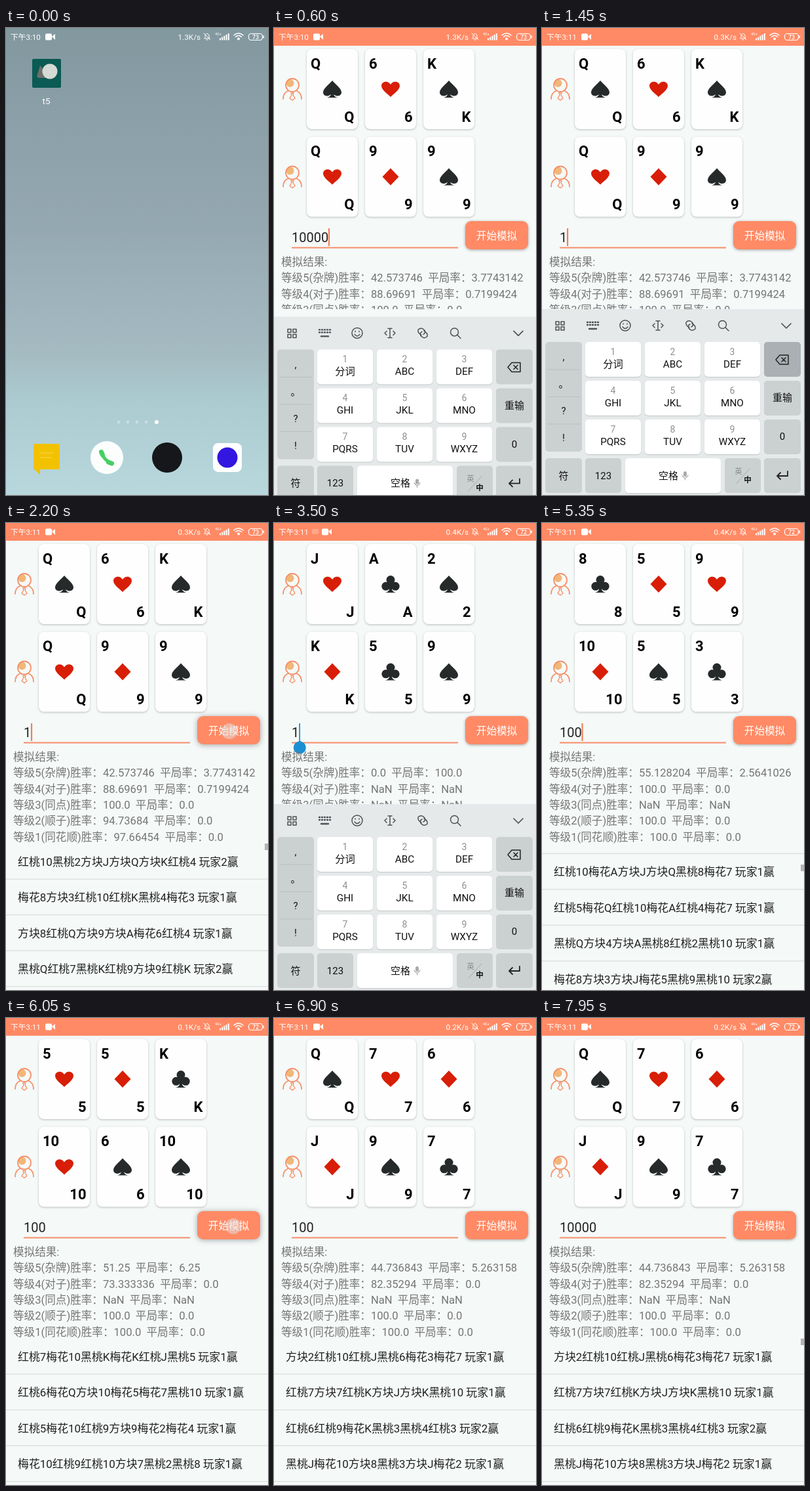
An HTML page with a canvas that plays this animation: 400 by 711 pixels, repeating every 8 s.

```html
<!DOCTYPE html>
<html lang="zh-CN">
<head>
<meta charset="utf-8">
<style>
html, body { margin: 0; height: 100%; overflow: hidden; background: #f5f9f8; }
canvas { display: block; }
</style>
</head>
<body>
<canvas id="stage" width="400" height="711"></canvas>
<script>
const ctx = document.getElementById('stage').getContext('2d');
const LOOP = 8000, KEYBOARD_TOP = 428, KEYBOARD_HEIGHT = 283, LIST_TOP = 488, ROW = 54.5;
const ORANGE = '#ff8a65', BACK = '#f5f9f8', INK = '#4d5153';
const FONT = 'Roboto, "Noto Sans CJK SC", "Noto Sans CJK", sans-serif';

const suitNames = { '♠': '黑桃', '♥': '红桃', '♣': '梅花', '♦': '方块' };
const ball = (x, y, r) => `M${x - r} ${y}a${r} ${r} 0 1 1 ${2 * r} 0a${r} ${r} 0 1 1 ${-2 * r} 0Z`;
const suitPaths = {
  '♠': new Path2D('M0-13C5-7 14-1 14 5C14 11 6 12 2 8Q3 12 8 13H-8Q-3 12-2 8C-6 12-14 11-14 5C-14-1-5-7 0-13Z'),
  '♥': new Path2D('M0 12C-5 7-14 1-14-5C-14-12-4-14 0-7C4-14 14-12 14-5C14 1 5 7 0 12Z'),
  '♦': new Path2D('M0-13L12.5 0L0 13L-12.5 0Z'),
  '♣': new Path2D(ball(0, -6.5, 6.5) + ball(-7.2, 3.3, 6.5) + ball(7.2, 3.3, 6.5) + 'M-2-2H2V8Q3 12 8 13H-8Q-3 12-2 8Z')
};

const NONE = 'NaN NaN';
const rounds = [
  { at: 0, hand: '♠Q♥6♠K♥Q♦9♠9', count: 10000,
    rates: ['42.573746 3.7743142', '88.69691 0.7199424', '100.0 0.0', '94.73684 0.0', '97.66454 0.0'],
    rows: ['♥10♠2♦J♦Q♦K♥4 2', '♣8♦3♥10♥K♠4♣3 1', '♦8♥Q♦9♦A♣6♥4 1', '♠Q♥7♠K♥9♦9♥K 2'] },
  { at: 2250, hand: '♦4♠10♥Q♣7♥2♠J', count: 1, rates: ['100.0 0.0', NONE, NONE, NONE, NONE], rows: ['♦4♠10♥Q♣7♥2♠J 1'] },
  { at: 2700, hand: '♣9♥3♠K♦6♠A♣4', count: 1, rates: ['100.0 0.0', NONE, NONE, NONE, NONE], rows: ['♣9♥3♠K♦6♠A♣4 2'] },
  { at: 3150, hand: '♥J♣A♠2♦K♣5♠9', count: 1, rates: ['0.0 100.0', NONE, NONE, NONE, NONE], rows: ['♥J♣A♠2♦K♣5♠9 0'] },
  { at: 4950, hand: '♣8♦5♥9♦10♠5♣3', count: 100, first: 15,
    rates: ['55.128204 2.5641026', '100.0 0.0', NONE, '100.0 0.0', '100.0 0.0'],
    rows: ['♥10♣A♦J♦Q♠8♣7 1', '♥5♣Q♥10♣A♥4♣7 1', '♠Q♦4♦A♠8♥2♠10 1', '♣8♦3♦J♣5♠9♠10 2'] },
  { at: 5750, hand: '♥5♦5♣K♥10♠6♠10', count: 100,
    rates: ['51.25 6.25', '73.333336 0.0', NONE, '100.0 0.0', '100.0 0.0'],
    rows: ['♥7♣10♠K♣K♥J♠5 1', '♥6♣Q♦10♣5♣7♠10 1', '♥5♣10♥9♦9♣2♣4 1', '♣10♥9♥10♦7♠2♠8 1'] },
  { at: 6100, hand: '♣2♠J♥8♦Q♥A♣6', count: 100, rows: [],
    rates: ['48.75 3.75', '80.0 0.0', NONE, '100.0 0.0', '100.0 0.0'] },
  { at: 6550, hand: '♠Q♥7♦6♦J♠9♣7', count: 100,
    rates: ['44.736843 5.263158', '82.35294 0.0', NONE, '100.0 0.0', '100.0 0.0'],
    rows: ['♦2♥10♥J♠6♣3♣7 1', '♥7♦7♥K♦J♦K♠10 1', '♥6♥9♣K♠3♠4♥3 2', '♠J♣10♦8♠3♦J♣2 1'] }
];
const levels = ['杂牌', '对子', '同点', '顺子', '同花顺'];
const entry = (at, value) => ({ at, value });
const typed = [entry(0, '10000'), entry(1000, '1000'), entry(1150, '100'), entry(1300, '10'), entry(1450, '1'),
  entry(4100, '10'), entry(4250, '100'), entry(7250, '1000'), entry(7450, '10000')];
const statuses = [
  { at: 0, clock: '3:10', speed: '1.3', charge: 73 },
  { at: 1400, clock: '3:11', speed: '0.3', charge: 73 },
  { at: 2700, clock: '3:11', speed: '0.4', charge: 72 },
  { at: 5600, clock: '3:11', speed: '0.1', charge: 72 },
  { at: 6700, clock: '3:11', speed: '0.2', charge: 72 }
];
const keyboardShown = [[509, 1700], [3360, 4450], [7000, 7800]];

const latest = (list, t) => list.filter(e => e.at <= t).pop();
const clamp = v => Math.min(1, Math.max(0, v));

function text(s, x, y, size, color, align = 'left', weight = 400) {
  ctx.font = `${weight} ${size}px ${FONT}`;
  ctx.fillStyle = color;
  ctx.textAlign = align;
  ctx.fillText(s, x, y + size * 0.36);
}
function rect(x, y, w, h, color, r = 0) {
  ctx.fillStyle = color;
  ctx.beginPath();
  ctx.roundRect(x, y, w, h, r);
  ctx.fill();
}
function circle(x, y, r, color) {
  ctx.fillStyle = color;
  ctx.beginPath();
  ctx.arc(x, y, r, 0, 7);
  ctx.fill();
}
function stroke(path, color, width = 1.5) {
  ctx.strokeStyle = color;
  ctx.lineWidth = width;
  ctx.lineCap = ctx.lineJoin = 'round';
  ctx.stroke(new Path2D(path));
}
function shadowed(blur, alpha, draw) {
  ctx.save();
  ctx.shadowColor = `rgba(0,0,0,${alpha})`;
  ctx.shadowBlur = blur;
  ctx.shadowOffsetY = 1;
  draw();
  ctx.restore();
}

function statusBar(t) {
  const { clock, speed, charge } = latest(statuses, t);
  const sliding = t >= 3400 && t < 3650;
  const camX = sliding ? 73 : 60;
  text('下午' + clock, 7, 13.5, 11.7, '#fff');
  if (sliding) rect(58, 9, 10, 8, 'rgba(255,255,255,.25)', 2);
  rect(camX, 8.5, 10, 10, '#fff', 2);
  ctx.fill(new Path2D(`M${camX + 10} 13l5-4v9z`));
  text(speed + 'K/s', 297, 13.5, 11.7, '#fff', 'right');
  stroke('M303 16H311L310 14V11Q307 6 304 11V14ZM306 18H308M302 8L312 18', '#fff', 1);
  text('4G+', 319, 9.5, 5.5, '#fff');
  for (let i = 0; i < 5; i++) rect(326 + i * 3.2, 15.5 - i * 1.8, 2, 3 + i * 1.8, '#fff');
  stroke('M348 11Q355 5 362 11M350.5 13.5Q355 9.5 359.5 13.5', '#fff', 1.6);
  circle(355, 16.5, 2, '#fff');
  ctx.strokeStyle = '#fff';
  ctx.lineWidth = 1.2;
  ctx.beginPath();
  ctx.roundRect(370.5, 8.5, 21, 10, 4);
  ctx.stroke();
  rect(392.5, 11.5, 1.5, 4, '#fff');
  text(charge, 381, 13.5, 9, '#fff', 'center', 500);
}

function home(t) {
  const sky = ctx.createLinearGradient(0, 0, 0, 711);
  [[0, '#82989f'], [0.42, '#94a8b2'], [0.7, '#a5bbc2'], [0.8, '#abcbd0'], [1, '#b8d8de']]
    .forEach(([p, c]) => sky.addColorStop(p, c));
  ctx.fillStyle = sky;
  ctx.fillRect(0, 0, 400, 711);
  statusBar(t);

  rect(40, 47, 44, 44, '#0b5a54', 2);
  ctx.fillStyle = '#6d6f69';
  ctx.fill(new Path2D('M47 74L52 57L59 66L68 76H50Z'));
  circle(67, 66, 11.5, '#d5dad4');
  text('t5', 61.5, 111.5, 13.5, '#fff', 'center');

  [172, 186, 200, 214].forEach(x => circle(x, 600, 2.3, 'rgba(255,255,255,.35)'));
  circle(230, 600, 3, '#fff');
  rect(42, 633, 40, 39, '#f2c200');
  ctx.fill(new Path2D('M42 671L52 680V671Z'));
  stroke('M52 647H72M52 654H69', '#f6d85c', 1.2);
  circle(154, 654, 25, '#fcfefd');
  stroke('M146 645Q148 657 161 663', '#45cf62', 5);
  stroke('M145.5 645.5L147.5 650M156.5 661L161.5 663', '#45cf62', 7);
  circle(246, 654, 23, '#15171a');
  rect(316, 632, 44, 44, '#fff', 8);
  circle(338, 654, 15.5, '#3316e0');
}

function player(y) {
  circle(24.5, y - 9, 6, '#f0b779');
  stroke(ball(28, y - 6, 10), '#f79068', 1.8);
  stroke(`M14 ${y + 15}Q14 ${y + 6} 21 ${y + 3}M42 ${y + 15}Q42 ${y + 6} 35 ${y + 3}`, '#f79068', 1.8);
  stroke(`M26 ${y + 6}H30L29 ${y + 9}L32 ${y + 14}L28 ${y + 17}L24 ${y + 14}L27 ${y + 9}Z`, '#f79068', 1.4);
}

function card(x, y, suit, rank) {
  shadowed(3, 0.25, () => rect(x, y, 78, 122, '#fdfefd', 8));
  text(rank, x + 6, y + 22, 22, '#000', 'left', 700);
  text(rank, x + 72.5, y + 103, 22, '#000', 'right', 700);
  ctx.save();
  ctx.translate(x + 39, y + 61);
  ctx.fillStyle = '♥♦'.includes(suit) ? '#d81e06' : '#262a2b';
  ctx.fill(suitPaths[suit]);
  ctx.restore();
}

// Deals six distinct cards, always the same ones for a given seed.
function dealRow(seed) {
  const MOD = 2147483647;
  seed = seed * 48271 % MOD;
  const random = () => (seed = seed * 16807 % MOD) / MOD;
  const ranks = 'A,2,3,4,5,6,7,8,9,10,J,Q,K'.split(',');
  const dealt = [];
  while (dealt.length < 6) {
    const next = '♠♥♣♦'[random() * 4 | 0] + ranks[random() * 13 | 0];
    if (!dealt.includes(next)) dealt.push(next);
  }
  return dealt.join('') + ' ' + (1 + (random() * 2 | 0));
}

function resultList(round, t) {
  const scroll = round.at === 4950 ? 914.3 * (1 - (1 - clamp((t - 5150) / 400)) ** 3) : 0;
  const first = round.first || 0;
  ctx.save();
  ctx.beginPath();
  ctx.rect(0, LIST_TOP, 400, 711 - LIST_TOP);
  ctx.clip();
  for (let i = Math.floor(scroll / ROW); i < round.count; i++) {
    const y = LIST_TOP + i * ROW - scroll;
    if (y > 711) break;
    const [cards, winner] = (round.rows[i - first] || dealRow(round.at + i * 7919 + 97)).split(' ');
    const outcome = winner === '0' ? '平局' : `玩家${winner}赢`;
    text(cards.replace(/[♠♥♣♦]/g, s => suitNames[s]) + ' ' + outcome, 18, y + 27.5, 16.9, '#212121');
    rect(0, y + ROW - 1, 400, 1.2, '#d9dddc');
  }
  const justShown = (t >= 1700 && t < 2250) || (t >= 4950 && t < 5700) || t >= 7800;
  if (justShown) rect(395, LIST_TOP + scroll * 0.04, 5, 10, '#b3b5b5');
  ctx.restore();
}

function input(t) {
  const { value } = latest(typed, t);
  text(value, 27, 319, 20, '#212121');
  const x = 27 + ctx.measureText(value).width;
  rect(27, 333.5, 254, 2, '#f58d6b');
  if (t >= 3400 && t < 4100) {
    rect(x, 305, 1.8, 27, '#1b8fd2');
    circle(x + 1, 342, 9.5, '#1b8fd2');
    ctx.fill(new Path2D(`M${x + 1} 331l7 6h-14z`));
  } else if (t % 1000 >= 150 && t % 1000 < 650) {
    rect(x - 0.3, 305, 2.2, 27, '#f27f58');
  }
}

function button(t) {
  const pressed = rounds.some(r => r.at && t >= r.at - 100 && t < r.at);
  shadowed(pressed ? 8 : 4, 0.35, () => rect(292, 294, 96, 43, ORANGE, 9));
  text('开始模拟', 340, 316, 15.6, '#fff', 'center');
  if (pressed) circle(t > 5000 ? 347 : 341, 317, 12, 'rgba(225,225,225,.5)');
}

function keyboard(t, top) {
  const hit = typed.find(e => e.at && t >= e.at - 50 && t < e.at + 50);
  const pressedKey = hit && (hit.at < 2000 ? 'delete' : '0');
  const grey = name => name && name === pressedKey ? '#aab0b3' : '#cbd0d1';

  ctx.save();
  ctx.translate(0, top);
  rect(0, 0, 400, KEYBOARD_HEIGHT, '#e5e9ea');

  [[21, 19], [29, 19], [21, 27], [29, 27]].forEach(([x, y]) => stroke(`M${x} ${y}h5v5h-5z`, INK));
  stroke('M69 20h1M73 20h1M77 20h1M81 20h1M85 20h1M69 24h1M73 24h1M77 24h1M81 24h1M85 24h1M72 30H83', INK, 2.4);
  stroke(ball(127, 25, 8) + 'M123 27Q127 32 131 27M124 22v1M130 22v1', INK);
  stroke('M177 18V32M174 18H180M174 32H180M172 22L169 25L172 28M182 22L185 25L182 28', INK);
  stroke('M225 28Q219 25 220 20Q225 15 230 21Q232 25 228 27M229 22Q235 25 234 30Q229 35 224 29Q222 25 226 23', INK);
  stroke(ball(275.5, 23.5, 6) + 'M280 28L285 33', INK);
  stroke('M366 22L373 29L380 22', INK, 1.7);

  rect(5, 50, 56, 167, '#cbd0d1', 5);
  [',', '。', '?', '!'].forEach((s, i) => {
    text(s, 33, 73 + i * 41, 15, '#111', 'center');
    if (i) rect(8, 50 + i * 41.5, 50, 1, '#b9bfc1');
  });
  ['分词', 'ABC', 'DEF', 'GHI', 'JKL', 'MNO', 'PQRS', 'TUV', 'WXYZ'].forEach((label, i) => {
    const x = 66 + (i % 3) * 91, y = 50 + Math.floor(i / 3) * 59;
    shadowed(1, 0.15, () => rect(x, y, 85, 53, '#fff', 5));
    text(i + 1, x + 42.5, y + 14.5, 14, '#8d9193', 'center');
    text(label, x + 42.5, y + 33, 15.3, '#111', 'center');
  });
  [['delete', ''], ['', '重输'], ['0', '0']].forEach(([name, label], i) => {
    rect(339, 50 + i * 59, 56, 53, grey(name), 5);
    text(label, 367, 76 + i * 59, 15, '#111', 'center');
  });
  stroke('M357 77L363 70H376V84H363ZM366 74L372 80M372 74L366 80', '#222');

  [[5, 56], [66, 55], [279, 55], [339, 56]].forEach(([x, w]) => rect(x, 227, w, 53, '#cbd0d1', 5));
  shadowed(1, 0.15, () => rect(127, 227, 146, 53, '#fff', 5));
  text('符', 33, 253.5, 15, '#111', 'center');
  text('123', 93.5, 253.5, 15, '#111', 'center');
  text('空格', 193, 253.5, 15, '#111', 'center');
  rect(216, 247, 5, 8, '#aaa', 2.5);
  stroke('M214 253Q218.5 261 223 253M218.5 257V260', '#aaa', 1.2);
  text('英', 300, 247, 11, '#888', 'center');
  text('中', 314, 260, 11.5, '#111', 'center', 700);
  stroke('M297 265L317 243', '#aaa', 1);
  stroke('M375 247V254H359M364 249L359 254L364 259', '#222', 1.8);
  ctx.restore();
}

function app(t) {
  const round = latest(rounds, t);
  const slot = keyboardShown.find(([show, hide]) => t >= show && t < hide + 140);
  const open = slot && t < slot[1];

  rect(0, 0, 400, 711, BACK);
  ctx.save();
  ctx.beginPath();
  ctx.rect(0, 0, 400, open ? KEYBOARD_TOP : 711);
  ctx.clip();
  player(93);
  player(226.5);
  [...round.hand.matchAll(/([♠♥♣♦])(\w+)/g)].forEach(([, suit, rank], i) =>
    card(50 + (i % 3) * 89, i < 3 ? 32 : 165.5, suit, rank));
  input(t);
  button(t);
  text('模拟结果:', 11, 356, 16.6, '#757575');
  round.rates.forEach((rate, i) => {
    const [win, draw] = rate.split(' ');
    text(`等级${5 - i}(${levels[i]})胜率：${win}  平局率：${draw}`, 11, 380.2 + i * 24.4, 16.6, '#757575');
  });
  if (!open) resultList(round, t);
  ctx.restore();

  rect(0, 0, 400, 27, ORANGE);
  statusBar(t);
  if (slot) {
    const hidden = open ? (1 - clamp((t - slot[0]) / 140)) ** 3 : clamp((t - slot[1]) / 140) ** 2;
    keyboard(t, KEYBOARD_TOP + KEYBOARD_HEIGHT * hidden);
  }
}

function frame() {
  const t = performance.now() % LOOP;
  (t < 550 ? home : app)(t);
  requestAnimationFrame(frame);
}
frame();
</script>
</body>
</html>
```
